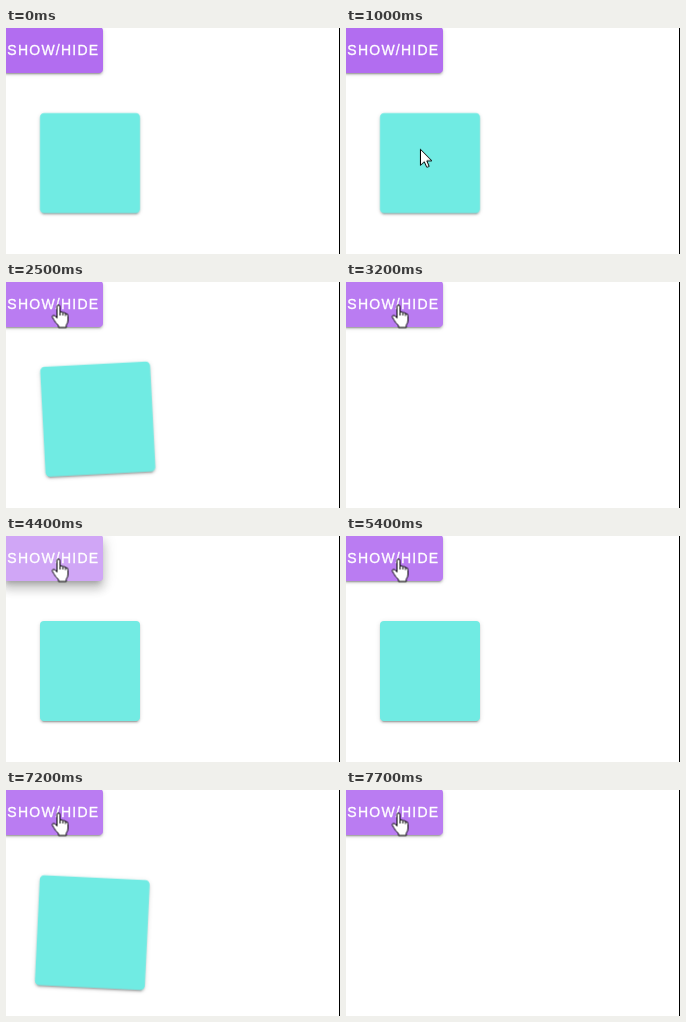
Write an HTML page that moves like this. It is 334 px wide and 226 px high and loops after 8 s.

```html
<!DOCTYPE html>
<html lang="en">
<head>
<meta charset="utf-8">
<title>Show/Hide</title>
<style>
  html, body { margin: 0; width: 100%; height: 100%; overflow: hidden; background: #fff; }
  #stage { position: relative; width: 334px; height: 226px; overflow: hidden; background: #fff; }
  #stage > * { position: absolute; }
  #button, #box {
    border-radius: 4px;
    box-shadow: 0 3px 1px -2px rgba(0,0,0,.2), 0 2px 2px 0 rgba(0,0,0,.14), 0 1px 5px 0 rgba(0,0,0,.12);
  }
  #button { left: -3px; top: -1px; width: 100px; height: 46px; background: #b26df0; }
  #clip { position: absolute; inset: 0; border-radius: 4px; overflow: hidden; }
  #hover { position: absolute; inset: 0; background: #fff; opacity: 0; }
  #ripple {
    position: absolute; left: -20px; top: -50px; width: 146px; height: 146px;
    border-radius: 50%; background: #fff; opacity: 0;
  }
  #label {
    position: absolute; left: 4.3px; top: 0; white-space: nowrap; color: #fff;
    font: 14px/46px "Liberation Sans", Arial, sans-serif; letter-spacing: 1.25px;
    -webkit-text-stroke: .35px #fff;
  }
  #box { left: 34px; top: 85px; width: 100px; height: 100px; background: #70ebe3; transform-origin: 0 0; }
  #edge { right: 0; top: 0; width: 1px; height: 100%; background: #000; }
  #cursor { left: 0; top: 0; width: 30px; height: 30px; overflow: visible; opacity: 0; }
  #cursor path { fill: #fff; stroke: #000; stroke-width: 1; stroke-linejoin: round; }
</style>
</head>
<body>
<div id="stage">
  <div id="button">
    <div id="clip"><div id="hover"></div><div id="ripple"></div></div>
    <span id="label">SHOW/HIDE</span>
  </div>
  <div id="box"></div>
  <div id="edge"></div>
  <svg id="cursor">
    <path id="arrow" d="M.5 .5V16.5L4.3 13L6.8 18.5L9.2 17.5L6.8 12H11.8Z"/>
    <g id="hand" transform="translate(-6.5 .5)">
      <path d="M5.5 13.5V2.2Q5.5 .5 7 .5T8.5 2.2V7.5Q10.3 6.6 11.3 8.2Q13 7.4 14 9Q16.5 8.8 16.5 11.5V16Q16.5 18.5 14.8 20.5V23H7V21Q4 18.5 2.5 15.5L.6 12.3Q1.2 10 3.4 11.2Z"/>
      <path d="M8.5 7.5V11M11.3 8.2V11M14 9V11.5"/>
    </g>
  </svg>
</div>
<script>
const LOOP = 8000;
const HOVER = 1510;
const PRESSES = [[1910, 2090], [4150, 4390], [6350, 6680]];
const HIDES = [2110, 6695];
const SHOW = 4395;
const RUN = 1000;

const $ = id => document.getElementById(id);

// steps: [time, value, easing to the next step]
function track(id, prop, steps, easing = "linear") {
  const all = [...steps];
  if (all[0][0] > 0) all.unshift([0, all[0][1]]);
  const last = all[all.length - 1];
  if (last[0] < LOOP) all.push([LOOP, last[1]]);
  $(id).animate(
    all.map(([t, value, ease]) => ({ offset: t / LOOP, [prop]: value, easing: ease || easing })),
    { duration: LOOP, iterations: Infinity }
  );
}

const pose = (scale, turn) => `scale(${scale}) rotate(${turn}deg)`;
const tada = start => [
  [0, 1, 0], [.1, .9, -3], [.2, .9, -3],
  ...[3, 4, 5, 6, 7, 8, 9].map(n => [n / 10, 1.1, n % 2 ? 3 : -3]),
  [1, 1, 0]
].map(([p, scale, turn]) => [start + p * RUN, pose(scale, turn)]);

const flash = [1, 0, 1, 0].map((v, i) => [SHOW + i * RUN / 4, v, "ease"]);

track("box", "transform", HIDES.flatMap(tada), "ease");
track("box", "opacity", [
  [0, 1], [HIDES[0] + RUN, 0], ...flash, [SHOW + RUN, 1], [HIDES[1] + RUN, 0]
], "step-end");

const shadow = up => up
  ? "0 5px 5px -3px rgba(0,0,0,.2), 0 8px 10px 1px rgba(0,0,0,.14), 0 3px 14px 2px rgba(0,0,0,.12)"
  : "0 3px 1px -2px rgba(0,0,0,.2), 0 2px 2px 0 rgba(0,0,0,.14), 0 1px 5px 0 rgba(0,0,0,.12)";
const lift = "cubic-bezier(.4,0,.2,1)";

track("button", "boxShadow", PRESSES.flatMap(([down, up]) => [
  [down, shadow(0), lift], [up, shadow(1), lift], [up + 280, shadow(0)]
]));
track("hover", "opacity", [[0, 0], [HOVER, 0], [HOVER + 15, .1]]);
track("ripple", "opacity", PRESSES.flatMap(([down, up]) => {
  const out = Math.max(up, down + 225);
  return [[down, 0], [down + 75, .35], [out, .35], [out + 150, 0]];
}));
track("ripple", "transform", PRESSES.flatMap(([down]) => [
  [down - 1, "scale(1)"], [down, "scale(.3)", lift], [down + 225, "scale(1)"]
]));

const at = (x, y) => `translate(${x}px, ${y}px)`;
track("cursor", "opacity", [[0, 0], [660, 1]], "step-end");
track("cursor", "transform", [
  [660, at(91, 184)], [700, at(90, 178)], [900, at(80, 142)], [1100, at(68, 100)],
  [1300, at(55, 58)], [1500, at(48, 26), "ease-out"], [1750, at(52, 22)]
]);
track("arrow", "opacity", [[0, 1], [1460, 0]], "step-end");
track("hand", "opacity", [[0, 0], [1460, 1]], "step-end");
</script>
</body>
</html>
```
